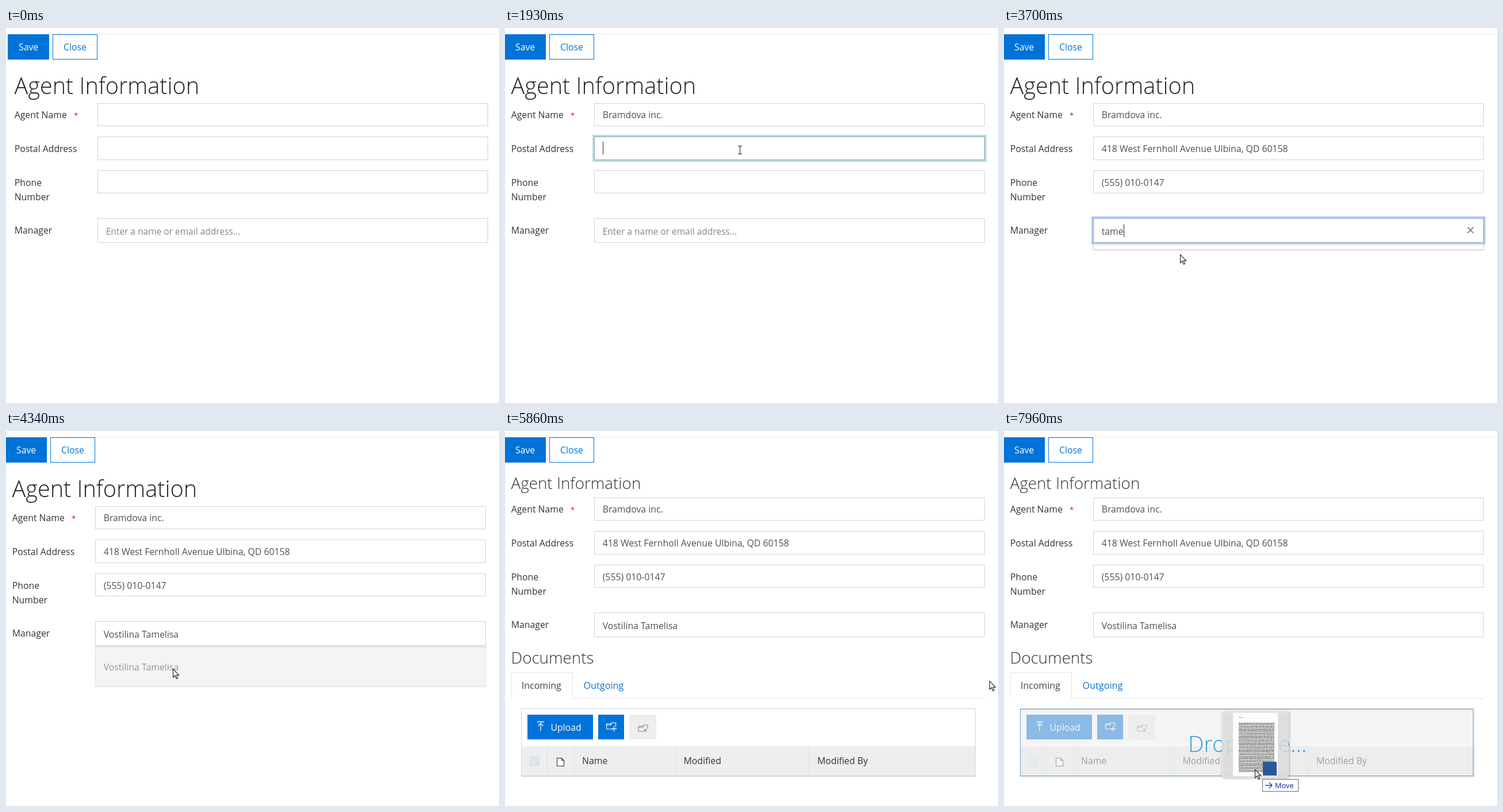
An HTML page with a canvas that plays this animation: 857 by 653 pixels, repeating every 7990 ms.

```html
<!DOCTYPE html>
<html lang="en">
<head>
<meta charset="utf-8">
<title>Agent form</title>
<style>
  html, body { margin: 0; width: 100%; height: 100%; overflow: hidden; background: #fff; }
  canvas { display: block; }
</style>
</head>
<body>
<canvas id="stage" width="857" height="653"></canvas>
<script>
const ctx = document.getElementById('stage').getContext('2d');
const LOOP = 7990;
const BLUE = '#0073d9', LINE = '#cbd5da', RED = '#e6093f';
const COMPANY = 'Bramdova inc.';
const ADDRESS = '418 West Fernholl Avenue Ulbina, QD 60158';
const PHONE = '(555) 010-0147';
const PERSON = 'Vostilina Tamelisa';
const QUERY = 'tame';
const FILLER = 'the quick plan for the next term is set out below and in the notes ';

// Moments of the story, in ms
const T = {
  name: 680, filled: 1340, postal: 1650, address: 2360, phone: 2730, number: 3400,
  manager: 3520, type: 3560, list: 3600, pick: 4210, save: 4960, saved: 5250,
  page: 5860, drag: 7640, drop: 7790
};

const fields = [
  { y: 131, h: 39, label: ['Agent Name'], labelY: 157, textY: 157 },
  { y: 189, h: 40, label: ['Postal Address'], labelY: 216, textY: 216 },
  { y: 248, h: 39, label: ['Phone', 'Number'], labelY: 275, textY: 275 },
  { y: 331, h: 42, label: ['Manager'], labelY: 358, textY: 360 }
];

// Pointer path: time, x, y
const path = [
  [260, 430, -14], [680, 445, 152], [920, 440, 157], [1339, 440, 157], [1340, 420, 223],
  [1600, 412, 212], [1930, 408, 212], [2360, 408, 212], [2640, 404, 271], [3400, 404, 271],
  [3530, 330, 355], [3700, 306, 394], [4000, 290, 414], [4720, 290, 414], [4940, 45, 36],
  [5030, 163, 44], [5300, 842, 435], [7360, 842, 435], [7390, 748, 565],
  [7560, 680, 660], [7640, 560, 770], [7900, 440, 594], [7960, 436, 589]
];

const ramp = (t, a, b) => Math.min(1, Math.max(0, (t - a) / (b - a)));
const within = (t, a, b) => t >= a && t < b;

function pointer(t) {
  if (t < path[0][0]) return null;
  for (let i = 1; i < path.length; i++) {
    const [t0, x0, y0] = path[i - 1], [t1, x1, y1] = path[i];
    if (t < t1) {
      const u = ramp(t, t0, t1), k = u * u * (3 - 2 * u);
      return { x: x0 + (x1 - x0) * k, y: y0 + (y1 - y0) * k };
    }
  }
  const last = path[path.length - 1];
  return { x: last[1], y: last[2] };
}

function text(s, x, y, color, size = 15.8, weight = 400) {
  ctx.font = `${weight} ${size}px "Open Sans", "Noto Sans", sans-serif`;
  ctx.fillStyle = color;
  ctx.fillText(s, x, y);
  return ctx.measureText(s).width;
}

function box(x, y, w, h, color) {
  ctx.fillStyle = color;
  ctx.fillRect(x, y, w, h);
}

function frame(x, y, w, h, color) {
  ctx.strokeStyle = color;
  ctx.lineWidth = 1;
  ctx.strokeRect(x + .5, y + .5, w, h);
}

function lines(color, width, ...parts) {
  ctx.strokeStyle = color;
  ctx.lineWidth = width;
  ctx.beginPath();
  for (const p of parts) {
    ctx.moveTo(p[0], p[1]);
    for (let i = 2; i < p.length; i += 2) ctx.lineTo(p[i], p[i + 1]);
  }
  ctx.stroke();
}

function faded(alpha, draw) {
  if (alpha <= 0) return;
  ctx.save();
  ctx.globalAlpha *= alpha;
  draw();
  ctx.restore();
}

function buttons(t) {
  const saving = within(t, T.save, T.saved);
  const w = saving ? 97 : 71;
  if (saving) {
    box(-1, 11, w + 1, 44, '#65afe8');
    ctx.save();
    ctx.beginPath();
    ctx.rect(-1, 11, w + 1, 44);
    ctx.clip();
    const slide = (t / 30) % 8;
    for (let x = -52 + slide; x < w; x += 8) lines('#4b9bd8', 2.8, [x, 9, x + 48, 57]);
    ctx.restore();
    text('Saving...', 18, 39, '#e4f2fc');
  } else {
    box(-1, 11, w + 1, 44, BLUE);
    text('Save', 18, 39, '#fff');
  }
  frame(w + 6, 11, 77, 43, BLUE);
  text('Close', w + 25, 39, BLUE);
}

function focus(t) {
  return [
    t < T.filled ? ramp(t, T.name, T.name + 150) : 0,
    ramp(t, T.postal, T.postal + 150) * (1 - ramp(t, T.phone, 2880)),
    ramp(t, 2760, 2880) * (1 - ramp(t, T.manager, T.manager + 120)),
    ramp(t, T.manager, T.manager + 130) * (1 - ramp(t, 4000, 4150))
  ];
}

function values(t) {
  const typed = QUERY.slice(0, Math.max(0, Math.floor((t - T.type) / 30) + 1));
  return [
    t >= T.filled ? COMPANY : '',
    t >= T.address ? ADDRESS : '',
    t >= T.number ? PHONE : '',
    t >= T.pick ? PERSON : typed
  ];
}

function caretField(t) {
  if (within(t, T.name, 1180) || within(t, T.filled, T.postal)) return 0;
  if (within(t, T.postal, 2160) || within(t, T.address, T.phone)) return 1;
  if (within(t, T.phone, 3040) || within(t, T.number, T.manager)) return 2;
  return within(t, T.manager, 4000) ? 3 : -1;
}

function form(t) {
  const error = within(t, T.filled, T.postal);
  const full = t >= T.page;
  const glow = focus(t), vals = values(t), caret = caretField(t);

  if (full) text('Agent Information', 10.5, 101, '#333', 27.8, 300);
  else text('Agent Information', 10.5, 115, '#222', 39.6, 300);

  fields.forEach((f, i) => {
    const dy = full ? -15 : error && i ? 24 : 0;
    const y = f.y + dy;
    f.label.forEach((s, n) => text(s, 10.7, f.labelY + dy + n * 25, '#333'));
    if (!i) text('*', 114, f.labelY + dy, RED, 13);

    faded(glow[i], () => {
      const ring = i === 3 ? '#b9c9f0' : '#bfd8de';
      box(152, y - 3, 685, f.h + 7, ring);
    });
    box(155, y, 679, f.h + 1, '#fff');
    frame(155, y, 678, f.h, error && !i ? RED : LINE);
    faded(glow[i], () => frame(155, y, 678, f.h, i === 3 ? '#8ea4dc' : '#7fa8b6'));

    const base = f.textY + dy;
    let w = 0;
    if (vals[i]) w = text(vals[i], 169.7, base, '#505050');
    else if (i === 3) text('Enter a name or email address...', 169.7, base, '#868686', 15.5);
    if (caret === i) box(Math.round(170 + w), base - 18, 1, 22, '#222');
  });

  if (error) text('This field is required.', 155.5, 191, RED, 12.6);
  if (within(t, T.type, T.pick)) {
    lines('#8c8c8c', 2, [806, 347, 816, 357], [816, 347, 806, 357]);
  }
}

function suggestions(t) {
  if (t < T.list) return;
  faded(1 - ramp(t, T.pick, 4490), () => {
    const h = 11 + 59 * ramp(t, 3760, 3850);
    ctx.save();
    ctx.shadowColor = 'rgba(0,0,0,.16)';
    ctx.shadowBlur = 3;
    ctx.shadowOffsetY = 1;
    box(155, 375, 679, h, '#fff');
    ctx.restore();
    const shade = ctx.createLinearGradient(0, 374, 0, 379);
    shade.addColorStop(0, '#bdbfc4');
    shade.addColorStop(1, '#fff');
    box(155, 374, 679, 5, shade);
    lines('#d4d4d4', 1, [155.5, 376, 155.5, 374.5 + h, 833.5, 374.5 + h, 833.5, 376]);
    if (h > 60) text(PERSON, 169.7, 417, '#444');
  });
}

function pastePopup(t) {
  if (t < T.filled) return;
  faded(1 - ramp(t, T.filled, 1460), () => {
    const g = ctx.createLinearGradient(0, 196, 0, 214);
    g.addColorStop(0, '#ccd5df');
    g.addColorStop(.4, '#b3c7e3');
    g.addColorStop(1, '#a3c5f5');
    box(407, 196, 314, 18, g);
    frame(407, 196, 313, 17, '#8b93a5');
    text(COMPANY, 427, 210.5, '#fff', 12.8);
  });
}

function folder(x, y, color) {
  lines(color, 1.2,
    [x + 10, y + 11, x, y + 11, x, y + 2, x + 7, y + 2, x + 9, y, x + 16, y, x + 16, y + 7],
    [x, y + 4, x + 7, y + 4, x + 9, y + 2]);
}

function documents(t) {
  text('Documents', 10.5, 405, '#333', 27.8, 300);
  lines('#dfe3e5', 1, [11.5, 465, 11.5, 420.5, 117.5, 420.5, 117.5, 465.5, 834, 465.5]);
  text('Incoming', 28.8, 449, '#444', 16);
  text('Outgoing', 136.5, 449, '#0f6fc6', 16.2);

  frame(28, 483, 789, 118, LINE);
  box(39, 494, 114, 43, BLUE);
  lines('#fff', 1.3, [56, 506.5, 68, 506.5], [62, 522, 62, 509], [57.5, 513.5, 62, 509, 66.5, 513.5]);
  text('Upload', 79.5, 522, '#fff');
  box(162, 494, 45, 43, BLUE);
  folder(176.5, 508, '#fff');
  lines('#fff', 1.3, [189.5, 514, 189.5, 523], [185, 518.5, 194, 518.5]);
  box(216, 494, 47, 43, '#eee');
  folder(232, 512, '#8a8a8a');
  lines('#8a8a8a', 1.2, [244, 525, 244, 519], [241.5, 521.5, 244, 519, 246.5, 521.5]);

  box(29, 549, 788, 52, '#eee');
  for (const x of [73, 120, 296, 528]) box(x, 548, 1, 52, '#dde0e2');
  lines('#d5dadd', 1, [28, 600.5, 817, 600.5]);
  box(42, 566, 18, 18, '#dae6e8');
  ctx.fillStyle = '#fff';
  ctx.fillRect(90, 569, 13, 15);
  lines('#333', 1.1, [90.5, 569.5, 98.5, 569.5, 102.5, 573.5, 102.5, 583.5, 90.5, 583.5, 90.5, 569],
    [98.5, 569.5, 98.5, 573.5, 102.5, 573.5]);
  text('Name', 134, 580, '#333');
  text('Modified', 310.5, 580, '#333');
  text('Modified By', 543, 580, '#333');

  faded(ramp(t, T.drop, T.drop + 90), () => {
    box(28, 484, 788, 117, 'rgba(238,238,238,.58)');
    frame(28, 484, 787, 116, '#5fa6d8');
    text('Drop here...', 320, 559, '#3c9ce0', 39, 300);
  });
}

function draggedFile(p) {
  const x = p.x - 57, y = p.y - 101;
  ctx.save();
  ctx.shadowColor = 'rgba(0,0,0,.35)';
  ctx.shadowBlur = 4;
  ctx.shadowOffsetX = ctx.shadowOffsetY = 1;
  ctx.fillStyle = 'rgba(234,234,234,.8)';
  ctx.beginPath();
  ctx.roundRect(x, y, 116, 116, 3);
  ctx.fill();
  ctx.restore();
  box(x + 19, y + 3, 78, 110, 'rgba(255,255,255,.93)');
  text('Notes', x + 29, y + 12, '#777', 2.6);
  ctx.save();
  ctx.beginPath();
  ctx.rect(x + 29, y + 19, 62, 88);
  ctx.clip();
  box(x + 29, y + 20, 62, 86, 'rgba(120,120,120,.22)');
  for (let i = 0; i < 36; i++) {
    const s = (FILLER + FILLER).slice((i * 11) % 60);
    text(s, x + 29, y + 22 + i * 2.4, '#555', 2.6, 600);
  }
  ctx.restore();
  box(x + 71, y + 88, 24, 24, '#2b579a');

  const lx = Math.round(p.x) + 13, ly = Math.round(p.y) + 17;
  box(lx, ly, 63, 22, '#fff');
  frame(lx, ly, 62, 21, '#6a6a6a');
  lines('#1b3fc4', 1.4, [lx + 5, ly + 11, lx + 17, ly + 11], [lx + 12, ly + 6, lx + 17, ly + 11, lx + 12, ly + 16]);
  text('Move', lx + 22, ly + 15.5, '#10209a', 12.8);
}

const arrowShape = new Path2D('M0 0V14.5L3.4 11.3L5.8 17L8 16L5.7 10.6H10.2Z');
const handShape = new Path2D('M-2 1.2Q-2 -.5 -.3 -.5Q1.4 -.5 1.4 1.2V7Q3 5.6 4.4 7.4Q6.2 6.4 7.2 8.4Q9 7.8 9 10V14Q9 17 7 19.5H-.5Q-2 17 -5.6 12.4Q-6.6 10.8 -5.2 10Q-4 9.4 -2 11.8Z');

function cursor(t, p) {
  ctx.save();
  ctx.translate(Math.round(p.x) + .5, Math.round(p.y) + .5);
  const beam = t < 3600 && p.y >= 131;
  if (beam) {
    lines('#222', 1, [0, -6, 0, 6]);
    lines('#222', 1.2, [-3.5, -7, -1, -7, 0, -6, 1, -7, 3.5, -7], [-3.5, 7, -1, 7, 0, 6, 1, 7, 3.5, 7]);
  } else {
    const hand = within(t, 4880, 5110);
    const shape = hand ? handShape : arrowShape;
    ctx.fillStyle = '#fff';
    ctx.strokeStyle = '#222';
    ctx.lineWidth = 1.1;
    ctx.fill(shape);
    ctx.stroke(shape);
    if (hand) lines('#222', 1, [1.4, 7, 1.4, 10], [4.4, 8, 4.4, 10.5], [7, 9, 7, 11]);
  }
  ctx.restore();
}

function render(t) {
  box(0, 0, 857, 653, '#fff');
  ctx.save();
  if (t < T.filled) ctx.translate(4, 0);
  box(-4, 10, 857, 1, '#e9ebec');
  buttons(t);
  form(t);
  suggestions(t);
  pastePopup(t);
  if (t >= T.page) documents(t);
  ctx.restore();
  const p = pointer(t);
  if (!p) return;
  if (t >= T.drag) draggedFile(p);
  cursor(t, p);
}

const start = performance.now();
function tick(now) {
  render(Math.max(0, now - start) % LOOP);
  requestAnimationFrame(tick);
}
render(0);
requestAnimationFrame(tick);
</script>
</body>
</html>
```
